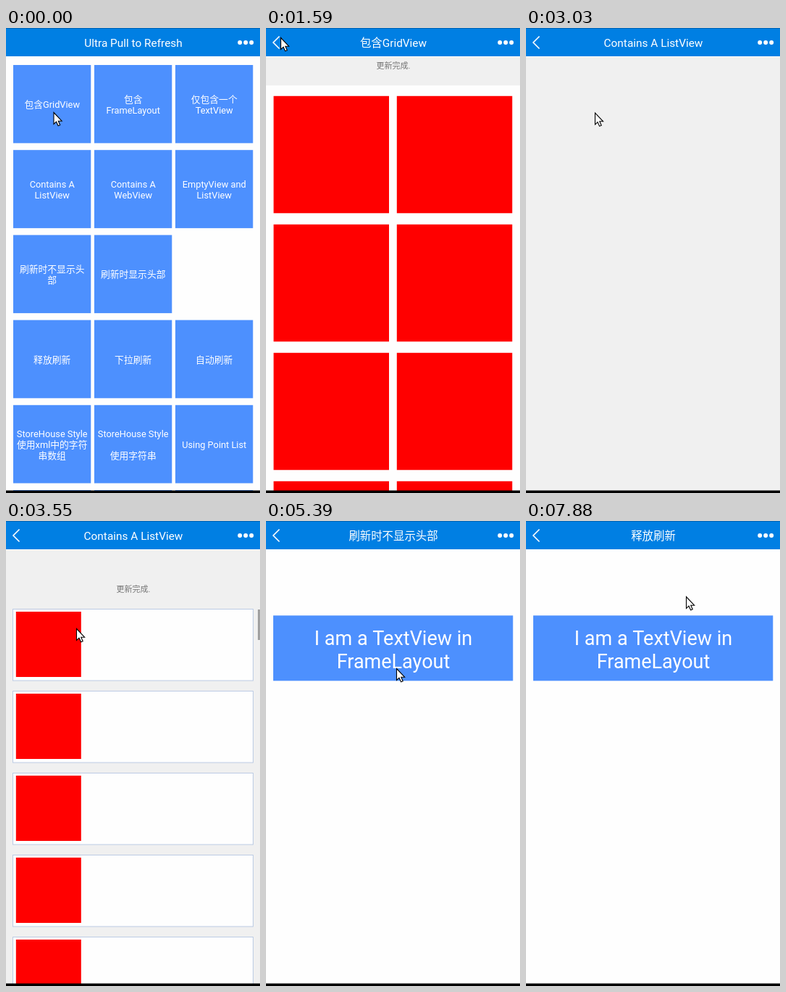
These frames come from a looping animation (351x641 px, 8000 ms). An HTML page with a canvas:

```html
<!DOCTYPE html>
<html lang="zh-CN">
<head>
<meta charset="utf-8">
<title>Ultra Pull to Refresh</title>
<style>
html, body { margin: 0; width: 100%; height: 100%; overflow: hidden; background: #fff; }
canvas { display: block; }
</style>
</head>
<body>
<canvas id="stage" width="351" height="641"></canvas>
<script>
const W = 351, H = 641, TOP = 40, LOOP = 8000;
const ctx = document.getElementById('stage').getContext('2d');
const FONT = 'Roboto, "Noto Sans CJK SC", "Noto Sans CJK", sans-serif';
const GREY = '#f0f0f0', BLUE = '#4d90fe', RED = '#f00', PAPER = '#fefefe';

const MENU = [
  ['包含GridView', '包含\nFrameLayout', '仅包含一个\nTextView'],
  ['Contains A\nListView', 'Contains A\nWebView', 'EmptyView and\nListView'],
  ['刷新时不显示头\n部', '刷新时显示头部'],
  ['释放刷新', '下拉刷新', '自动刷新'],
  ['StoreHouse Style\n使用xml中的字符\n串数组', 'StoreHouse Style\n\n使用字符串', 'Using Point List'],
  ['', '', '']
];

// Every page stays open equally long; the pointer taps a cell, drags the page
// down by `peak` from `grab`, lets go and leaves through the back arrow.
const STAY = 1400, DRAG = 300, LET_GO = 750, LOADED = 480;
const BACK = { x: 20, y: 13 };
const VISITS = [
  { open: 430, rest: 430, title: '包含GridView', draw: grid,
    tap: { x: 65.5, y: 116 }, grab: { at: 120, x: 65, y: 116 }, peak: 54, close: 1057 },
  { open: 2860, rest: 430, title: 'Contains A ListView', draw: list,
    tap: { x: 90.5, y: 227 }, grab: { at: 270, x: 97, y: 67 }, peak: 81, close: 800 },
  { open: 5100, rest: 140, title: '刷新时不显示头部', draw: textView,
    tap: { x: 63, y: 340 }, grab: { at: 290, x: 180, y: 203 }, peak: 60, close: 800 },
  { open: 7290, rest: 140, title: '释放刷新', draw: textView,
    tap: { x: 62, y: 440 }, grab: { at: 590, x: 221, y: 104 }, peak: 60, close: 800 }
];

const mix = (a, b, p) => a + (b - a) * p;
const clamp = p => Math.max(0, Math.min(1, p));

function ramp(t, start, length) {
  const p = clamp((t - start) / length);
  return p * p * (3 - 2 * p);
}

function rect(x, y, w, h, color) {
  ctx.fillStyle = color;
  ctx.fillRect(x, y, w, h);
}

function label(text, x, y, size, lineHeight = 0, color = '#fff') {
  ctx.font = `${size}px ${FONT}`;
  ctx.textAlign = 'center';
  ctx.fillStyle = color;
  const lines = text.split('\n');
  lines.forEach((s, i) =>
    ctx.fillText(s, x, Math.round(y + size * 0.355 + (i - (lines.length - 1) / 2) * lineHeight)));
}

function menu() {
  MENU.forEach((row, r) => row.forEach((text, c) => {
    const x = 10 + c * 112, y = 51 + r * 117.2;
    rect(x, y, 107.3, 107.7, BLUE);
    label(text, x + 53.7, y + 54.5, 12.8, 15);
  }));
}

function header(pull, text) {
  rect(0, TOP, W, pull, GREY);
  if (pull) label(text, 176, TOP + pull - 27, 11, 0, '#777');
}

const status = loaded => loaded ? '更新完成.' : '正在加载...';

function grid(pull, loaded) {
  header(pull, status(loaded));
  if (!loaded) return;
  for (let i = 0; i < 8; i++)
    rect(10.5 + (i % 2) * 170.3, TOP + pull + 14.5 + (i >> 1) * 177, 159.5, 161.5, RED);
}

function list(pull, loaded) {
  const top = TOP + pull;
  rect(0, TOP, W, H, GREY);
  header(pull, status(loaded));
  if (!loaded) return;
  ctx.strokeStyle = '#bccbe4';
  ctx.lineWidth = 1;
  for (let y = top; y < H; y += 113) {
    rect(9.5, y + 0.5, 332, 98.5, PAPER);
    ctx.strokeRect(9.5, y + 0.5, 332, 98.5);
    rect(13.8, y + 4, 90, 90, RED);
  }
  rect(348, top + 1, 3, 42, '#a0a0a0');
}

function textView(pull) {
  header(pull, '下拉刷新');
  rect(10, 130.3 + pull, 331.3, 90, BLUE);
  label('I am a TextView in\nFrameLayout', 176, 177 + pull, 27, 32);
}

function toolbar(title, home) {
  rect(0, 0, W, 39, '#007fe3');
  rect(0, 0, W, 1, '#0064b4');
  label(title, 176, 20.7, 15.4);
  ctx.fillStyle = '#fff';
  for (let i = 0; i < 3; i++) {
    ctx.beginPath();
    ctx.arc(323.2 + i * 8, 20, 3, 0, 7);
    ctx.fill();
  }
  if (home) return;
  ctx.strokeStyle = '#fff';
  ctx.lineWidth = 1.6;
  ctx.stroke(new Path2D('M18.5 11.5L10 20L18.5 28.5'));
}

const ARROW = new Path2D('M.5 .5V16.5L4 13.2L6.6 18.8L9.2 17.7L6.8 12.2H11.6Z');

function pointer(x, y) {
  ctx.save();
  ctx.translate(x, y);
  ctx.fillStyle = '#fff';
  ctx.strokeStyle = '#000';
  ctx.lineWidth = 1.1;
  ctx.fill(ARROW);
  ctx.stroke(ARROW);
  ctx.restore();
}

// From the back arrow to the next cell, slow at first
function showMenu(t, { open, rest, tap }, previous) {
  const left = previous ? previous.open + STAY : -1;
  const p = clamp((t - left) / (open - rest - left));
  menu();
  toolbar('Ultra Pull to Refresh', true);
  pointer(mix(BACK.x, tap.x, p ** 2), mix(BACK.y, tap.y, p ** 3));
}

function showPage(age, { title, draw, tap, grab, peak, close }) {
  const reach = ramp(age, 0, grab.at), leave = ramp(age, LET_GO, 400);
  const drag = peak * ramp(age, grab.at, DRAG);
  draw(drag * (1 - ramp(age, close, 300)), age > LOADED);
  toolbar(title);
  pointer(mix(mix(tap.x, grab.x, reach), BACK.x, leave),
          mix(mix(tap.y, grab.y, reach) + drag, BACK.y, leave));
}

function render(t) {
  const i = VISITS.findIndex(v => t < v.open + STAY), visit = VISITS[i];
  rect(0, 0, W, H, PAPER);
  if (t < visit.open) showMenu(t, visit, VISITS[i - 1]);
  else showPage(t - visit.open, visit);
  rect(0, 637.5, W, 4, '#000');
}

let begin;
function tick(now) {
  begin ??= now;
  render((now - begin) % LOOP);
  requestAnimationFrame(tick);
}
requestAnimationFrame(tick);
</script>
</body>
</html>
```
